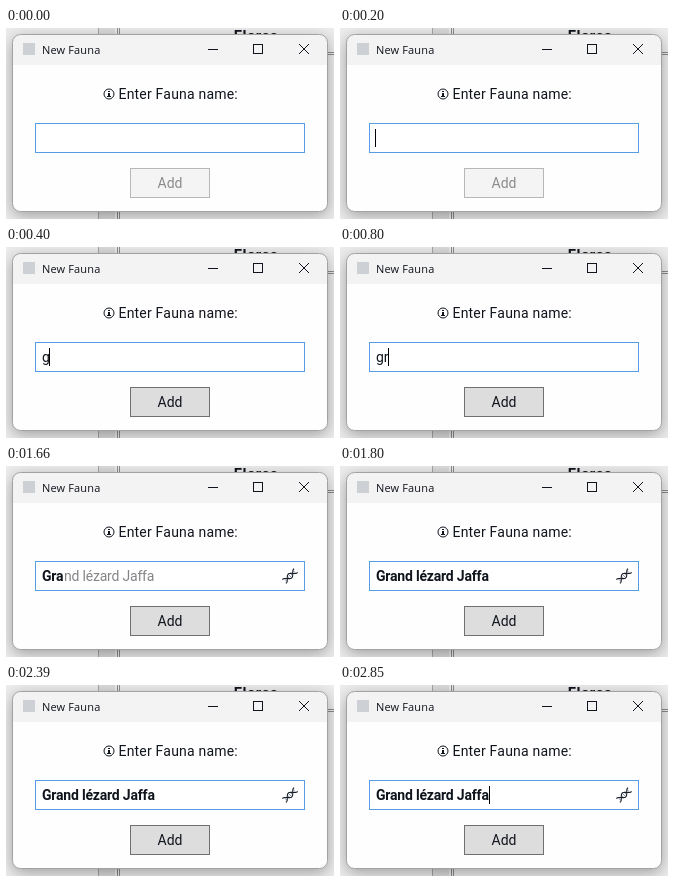
These frames come from a looping animation (328 px wide and 191 px high, 3.05 s). An HTML page with a canvas:

```html
<!DOCTYPE html>
<html lang="en">
<head>
<meta charset="utf-8">
<title>New Fauna</title>
<style>
html, body { margin: 0; width: 100%; height: 100%; overflow: hidden; }
canvas { display: block; width: 328px; height: 191px; }
</style>
</head>
<body>
<canvas id="stage" width="328" height="191"></canvas>
<script>
const ctx = document.getElementById('stage').getContext('2d');
const LOOP = 3050;
const FULL = 'Grand lézard Jaffa';
const INK = '#10141c';
const FACE = '14px Roboto, sans-serif';

// start time, typed text, caret x (0 hides it)
const STEPS = [
  [0, '', 0],
  [200, '', 35],
  [400, 'g', 43],
  [800, 'gr', 48],
  [1130, 'Gra', 58],
  [1660, 'Gra', 0],
  [1800, FULL, 0],
  [1860, FULL, 149],
  [2390, FULL, 0],
  [2850, FULL, 149]
];

function rect(x, y, w, h, fill) {
  ctx.fillStyle = fill;
  ctx.fillRect(x, y, w, h);
}

function box(x, y, w, h, fill, edge) {
  rect(x, y, w, h, edge);
  rect(x + 1, y + 1, w - 2, h - 2, fill);
}

function text(str, x, y, font, color, spacing = 0, align = 'left') {
  ctx.font = font;
  ctx.fillStyle = color;
  ctx.letterSpacing = spacing + 'px';
  ctx.textAlign = align;
  ctx.fillText(str, x, y);
}

function line(points, color, width = 1) {
  ctx.beginPath();
  points.forEach(([x, y]) => ctx.lineTo(x, y));
  ctx.strokeStyle = color;
  ctx.lineWidth = width;
  ctx.stroke();
}

function drawBackdrop() {
  rect(0, 0, 328, 191, '#ededed');
  rect(92, 0, 17, 191, '#dcdcdc');
  rect(92, 0, 1, 191, '#a6a6a6');
  box(111, 24, 230, 180, '#ededed', '#8c8c8c');
  rect(111, 0, 1, 191, '#8c8c8c');
  rect(113, 0, 1, 191, '#8c8c8c');
  rect(113, 26, 215, 1, '#8c8c8c');
  text('Flores', 250, 13, 'bold 15px Roboto, sans-serif', INK, 0.4, 'center');
}

function drawWindow() {
  const frame = new Path2D();
  frame.roundRect(6.5, 6.5, 315, 177, 8);
  ctx.save();
  ctx.shadowColor = 'rgba(0, 0, 0, 0.34)';
  ctx.shadowBlur = 16;
  ctx.shadowOffsetY = 4;
  ctx.fillStyle = '#fff';
  ctx.fill(frame);
  ctx.restore();

  ctx.save();
  ctx.clip(frame);
  rect(6, 6, 316, 31, '#f3f3f3');
  rect(6, 37, 316, 147, '#fefefe');
  ctx.restore();
  ctx.strokeStyle = '#a2a2a2';
  ctx.lineWidth = 1;
  ctx.stroke(frame);

  rect(17, 15, 12, 12, '#cdd0d4');
  text('New Fauna', 36, 26, '11px "Open Sans", sans-serif', INK, 0.15);
  line([[202, 21.5], [212, 21.5]], INK);
  ctx.strokeRect(247.5, 16.5, 9, 9);
  line([[293, 16], [303, 26]], INK);
  line([[303, 16], [293, 26]], INK);
}

function drawPrompt() {
  ctx.beginPath();
  ctx.arc(103, 66, 5, 0, Math.PI * 2);
  ctx.strokeStyle = INK;
  ctx.lineWidth = 1;
  ctx.stroke();
  rect(102, 63, 2, 1, INK);
  rect(102, 65, 2, 4, INK);
  rect(101, 68, 4, 1, INK);
  text('Enter Fauna name:', 112.5, 71, FACE, INK, 0.2);
}

function drawHelix(cx, cy) {
  ctx.save();
  ctx.translate(cx, cy);
  ctx.rotate(-0.75);
  const wave = u => 2.6 * Math.cos(u * 0.42);
  for (let u = -6; u <= 6; u += 2) {
    line([[u, wave(u)], [u, -wave(u)]], '#6f7c92', 0.8);
  }
  for (const side of [1, -1]) {
    const strand = [];
    for (let u = -8; u <= 8; u += 0.5) strand.push([u, side * wave(u)]);
    line(strand, '#1b1f2a', 1.1);
  }
  ctx.restore();
}

function drawField(typed, caret) {
  box(29, 95, 270, 30, '#fff', '#569de5');
  const matched = typed.length > 2;
  const weight = matched ? '600 ' : '';
  text(typed, 36, 115, weight + FACE, INK, -0.2);
  if (matched) {
    text(FULL.slice(typed.length), 58, 115, FACE, '#858589', -0.2);
    drawHelix(284, 110);
  }
  if (caret) rect(caret, 101, 1, 18, '#000');
}

function drawButton(enabled) {
  const [fill, edge, ink] = enabled
    ? ['#dddddd', '#707070', INK]
    : ['#f4f4f4', '#b5b7b9', '#8b8b8b'];
  box(124, 140, 80, 30, fill, edge);
  text('Add', 164, 160, FACE, ink, 0, 'center');
}

function draw(now) {
  const t = now % LOOP;
  const [, typed, caret] = STEPS.findLast(step => step[0] <= t);
  drawBackdrop();
  drawWindow();
  drawPrompt();
  drawField(typed, caret);
  drawButton(typed !== '');
}

let start;
function tick(now) {
  start ??= now;
  draw(Math.max(0, now - start));
  requestAnimationFrame(tick);
}
requestAnimationFrame(tick);
</script>
</body>
</html>
```
